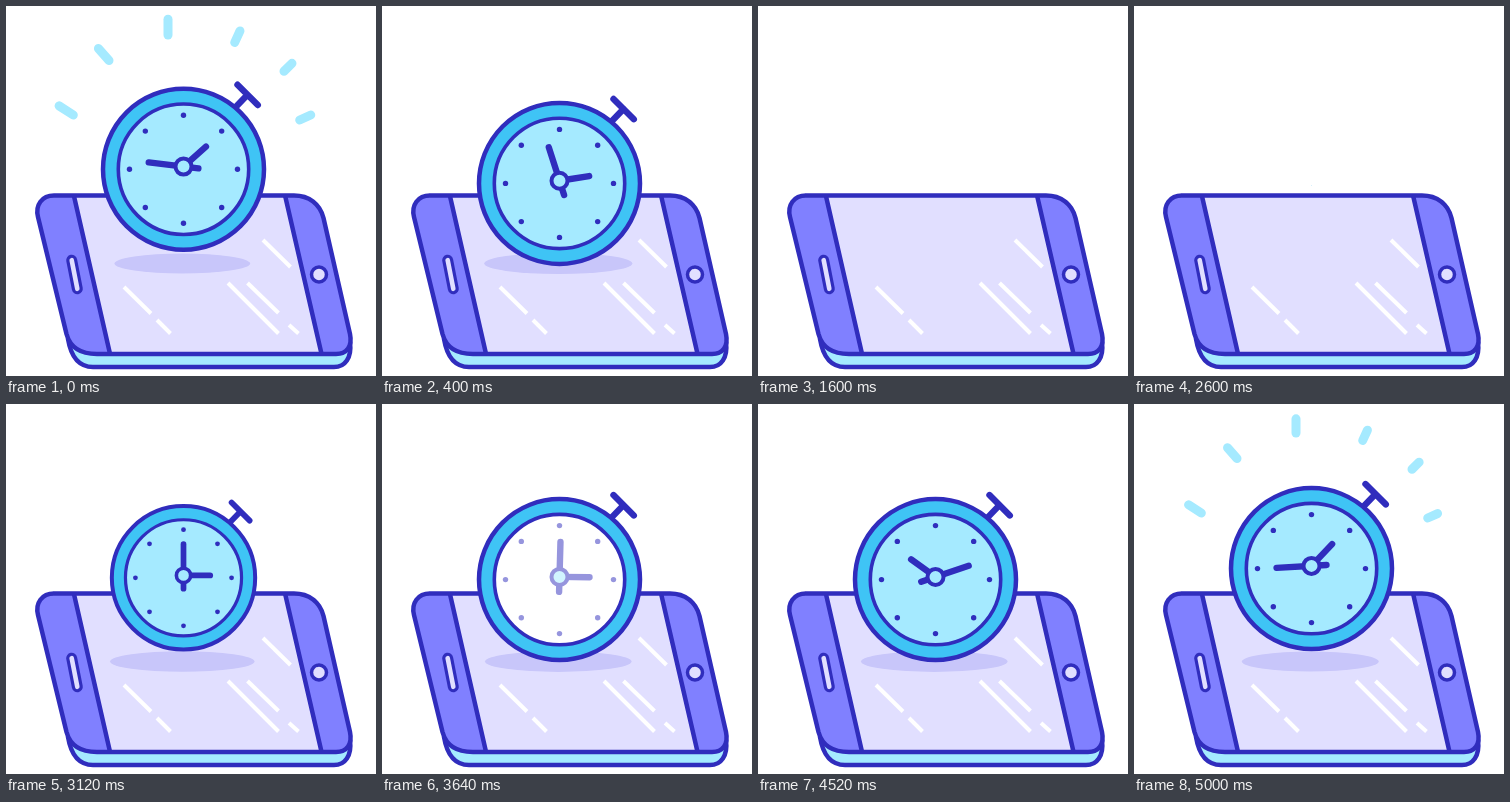
Write an HTML page that moves like this. It is 370 px wide and 370 px high and loops after 5040 ms.

```html
<!DOCTYPE html>
<html lang="en">
<head>
<meta charset="utf-8">
<title>Stopwatch on a phone</title>
<style>
html, body { margin: 0; width: 100%; height: 100%; overflow: hidden; background: #fff; }
svg { display: block; width: 100vw; height: 100vh; }
.ink { stroke: #302dbd; stroke-width: 4.5; stroke-linejoin: round; }
.line { fill: none; stroke: #302dbd; stroke-width: 6.4; stroke-linecap: round; }
</style>
</head>
<body>
<svg viewBox="0 0 370 370">
  <defs>
    <path id="body" d="M48 189.5H288C303 189.5 314 198 317.5 212L344 328C346.500 340 341 348 330 348H91C74 348 64 341 60.500 328L32 211C29 199 36 189.500 48 189.500Z"/>
    <clipPath id="bodyClip"><use href="#body"/></clipPath>
  </defs>

  <g id="phone">
    <path class="ink" fill="#a5eaff" d="M62 333C65 351 73 361 87 361H328C339 361 346 352 344 336Z"/>
    <use href="#body" fill="#e1dfff"/>
    <g class="ink" fill="#8080ff" clip-path="url(#bodyClip)">
      <path d="M67.500 188L104.500 350H0V188Z"/>
      <path d="M278.700 188L316 350H370V188Z"/>
    </g>
    <use href="#body" class="ink" fill="none"/>
    <g fill="none" stroke-linecap="round">
      <path d="M65.700 254.200L71.300 282.800" stroke="#302dbd" stroke-width="11"/>
      <path d="M65.700 254.200L71.300 282.800" stroke="#e1dfff" stroke-width="4.600"/>
    </g>
    <circle cx="313" cy="268.500" r="7.500" fill="#e1dfff" stroke="#302dbd" stroke-width="3.500"/>
    <path fill="none" stroke="#fff" stroke-width="4" d="M118 281L145 307.500M151 314L164.500 327.500M222 277L272.500 327.500M241.500 277L272.500 307M283 319L292.500 327.500M257 234L284.500 261"/>
  </g>

  <ellipse id="shadow" cx="176.300" cy="257.500" fill="#c8c6fa"/>

  <g id="clock">
    <path class="line" d="M51.500 -61.500L64 -74.500M54 -84.500L74.300 -64.200"/>
    <circle class="ink" r="80.500" fill="#3fc4f5"/>
    <circle r="65.200" fill="#a5eaff"/>
    <circle id="white" r="65.200" fill="#fff"/>
    <circle r="65.200" fill="none" stroke="#302dbd" stroke-width="3.600"/>
    <g id="marks">
      <g id="dots" fill="#302dbd"></g>
      <g transform="translate(0 -2.700)">
        <path id="hour" class="line" d="M0 0V-30"/>
        <path id="minute" class="line" d="M0 15V-35"/>
        <circle r="8" fill="#a5eaff" stroke="#302dbd" stroke-width="4"/>
      </g>
    </g>
  </g>

  <g id="rays" fill="none" stroke="#a5eaff" stroke-width="9" stroke-linecap="round"></g>
</svg>

<script>
const LOOP = 5040, STEP = 40, FIRST = 1000;
const NS = "http://www.w3.org/2000/svg";
const $ = id => document.getElementById(id);
const set = (el, attrs) => {
  for (const k in attrs) el.setAttribute(k, attrs[k]);
  return el;
};
const add = (parent, tag, attrs) =>
  parent.appendChild(set(document.createElementNS(NS, tag), attrs));

const clamp = v => Math.min(1, Math.max(0, v));
const mix = (a, b, k) => a + (b - a) * k;
const smooth = (t, from, to) => {
  const k = clamp((t - from) / (to - from));
  return k * k * (3 - 2 * k);
};

// Cubic ease with handles (a, 0) and (b, 1), solved by bisection.
function bezier(x, a, b) {
  let lo = 0, hi = 1;
  for (let i = 0; i < 30; i++) {
    const s = (lo + hi) / 2, r = 1 - s;
    if (3 * r * r * s * a + 3 * r * s * s * b + s * s * s < x) lo = s;
    else hi = s;
  }
  return lo * lo * (3 - 2 * lo);
}

for (let i = 0; i < 8; i++) {
  const a = i * Math.PI / 4;
  add($("dots"), "circle", { cx: 54 * Math.sin(a), cy: -54 * Math.cos(a), r: 2.7 });
}

// Each ray runs from its inner end to its outer end.
const rays = [
  [162, 29, 162, 12.5],
  [228.7, 36.5, 234.2, 24.5],
  [278, 65.3, 286.3, 57],
  [293.7, 114, 305.2, 108.8],
  [103, 54.5, 92, 42],
  [67.3, 109, 52.5, 99.5]
].map(ends => ({ ends, el: add($("rays"), "path", {}) }));

// Height of the hop, 0 at rest and 1 at the top.
function hop(t) {
  if (t < 3340) return smooth(t, 2980, 3340);
  if (t > 5540) return 0;
  return (1 + Math.cos(2 * Math.PI * (t - 3340) / 880)) / 2;
}

function drawRays(t) {
  const local = t < 4560 ? t + 880 : t;
  const outer = smooth(local, 4740, 5080);
  const inner = smooth(local, 5060, 5380);
  for (const { ends: [x1, y1, x2, y2], el } of rays) {
    const at = k => mix(x1, x2, k) + " " + mix(y1, y2, k);
    set(el, { d: outer - inner > 0.005 ? `M${at(inner)}L${at(outer)}` : "" });
  }
}

function draw(time) {
  const step = Math.floor(time / STEP) * STEP;
  const t = (step - FIRST + LOOP) % LOOP + FIRST;
  const up = hop(t);

  const leave = 1 - smooth(t, 1020, 1600);
  const scale = t < 2000 ? leave : smooth(t, 2580, 3260);
  const shade = t < 2000 ? leave : smooth(t, 2580, 3140);
  set($("clock"), {
    transform: `translate(177.5 ${179.5 - 17 * up}) scale(${scale})`,
    visibility: scale > 0 ? "visible" : "hidden"
  });
  set($("shadow"), { rx: shade * (75 - 7.5 * up), ry: shade * (10.5 - 0.5 * up) });

  const turn = 720 * bezier(clamp((t - 3580) / 2260), 0.333, 0.306);
  set($("minute"), { transform: `rotate(${turn})` });
  set($("hour"), { transform: `rotate(${90 + turn / 2})` });

  const flash = clamp(1 - Math.abs(t - 3640) / 120);
  set($("white"), { opacity: clamp(flash * 1.5) });
  set($("marks"), { opacity: 1 - flash / 2 });

  drawRays(t);
}

const start = performance.now();
function tick(now) {
  draw(Math.max(0, now - start) % LOOP);
  requestAnimationFrame(tick);
}
draw(0);
requestAnimationFrame(tick);
</script>
</body>
</html>
```
